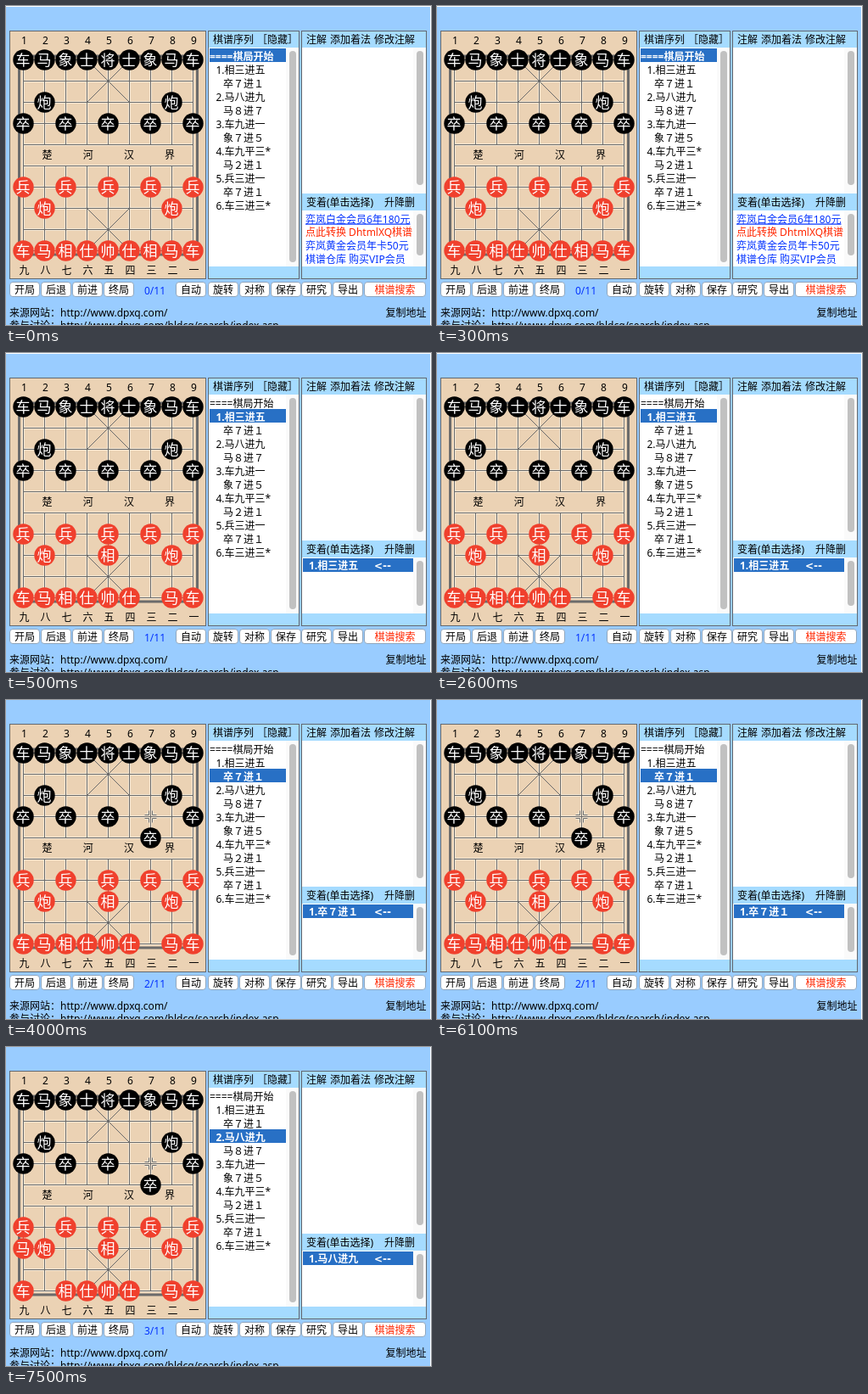
An HTML page for the animation above (8 s loop, 501 by 376 pixels).

```html
<!DOCTYPE html>
<html lang="zh-CN">
<head>
<meta charset="utf-8">
<style>
html, body { margin: 0; width: 100%; height: 100%; overflow: hidden; background: #fff; }
svg { display: block; }
text { font: 12px "Noto Sans", "Noto Sans CJK SC", "Noto Sans CJK", sans-serif; white-space: pre; }
.mid { text-anchor: middle; }
.bold { font-weight: bold; }
.arrow { font-family: "DejaVu Sans", sans-serif; font-weight: bold; }
.piece { font-size: 17px; font-weight: 300; text-anchor: middle; }
.link { text-decoration: underline; }
</style>
</head>
<body>
<svg id="stage" width="501" height="376" viewBox="0 0 501 376"></svg>
<script>
const BLUE = '#0433ff', RED = '#ff2600', SELECTED = '#2870c5', EDGE = '#62686e', HEADER = '#a5dbff';
const LINE = '#6b6b6b', LINE_GLOW = '#f6e8d4';
const stepTimes = [0, 500, 4000, 7500], loop = 8000;
const moves = ['====棋局开始', '1.相三进五', '卒７进１', '2.马八进九', '马８进７', '3.车九进一',
  '象７进５', '4.车九平三*', '马２进１', '5.兵三进一', '卒７进１', '6.车三进三*'];
// Each board move: [from column, from row, to column, to row]
const boardMoves = [[6, 9, 4, 7], [6, 3, 6, 4], [1, 9, 0, 7]];
const offers = [['弈岚白金会员6年180元', BLUE, 'link'], ['点此转换 DhtmlXQ棋谱', RED],
  ['弈岚黄金会员年卡50元', BLUE], ['棋谱仓库 购买VIP会员', BLUE]];
const buttons = [[4, '开局'], [41, '后退'], [78, '前进'], [115, '终局'], [200, '自动'], [238, '旋转'],
  [275, '对称'], [312, '保存'], [348, '研究'], [385, '导出'], [422, '棋谱搜索', 73, RED]];

// Centres of the board points
const column = i => 20.5 + 25 * i;
const row = i => 62.5 + 25 * i;
const rect = (x, y, w, h, fill, extra = '') =>
  `<rect x="${x}" y="${y}" width="${w}" height="${h}" fill="${fill}" ${extra}/>`;
const panel = (x, w, fill) => rect(x + .5, 28.5, w - 1, 292, fill, `stroke="${EDGE}"`);
const path = (d, width = 1, color = LINE) =>
  `<path d="${d}" fill="none" stroke="${color}" stroke-width="${width}"/>`;
// y is the vertical middle of the text
const label = (x, y, words, fill = '#000', cls = '') =>
  `<text x="${x}" y="${y + 4.5}" fill="${fill}" class="${cls}">${words.replace(/</g, '&lt;')}</text>`;
const scrollbar = (x, top, bottom) => rect(x, top, 8, bottom - top, '#c1c1c1', 'rx="4"');

function boardLines() {
  let grid = '', diagonals = '';
  for (let r = 0; r < 10; r++) grid += `M20.5 ${row(r)}h200`;
  for (let c = 0; c < 9; c++)
    grid += `M${column(c)} 62.5` + (c % 8 ? 'v100m0 25v100' : 'v225');
  for (const y of [row(0), row(7)]) diagonals += `M95.5 ${y}l50 50m0 -50l-50 50`;
  const marks = [[1, 2], [7, 2], [1, 7], [7, 7]];
  for (let c = 0; c < 9; c += 2) marks.push([c, 3], [c, 6]);
  for (const [c, r] of marks)
    for (const sx of [-1, 1]) for (const sy of [-1, 1])
      if (c + sx >= 0 && c + sx <= 8)
        grid += `M${column(c) + 7 * sx} ${row(r) + 2 * sy}h${-5 * sx}v${5 * sy}`;
  return path(grid, 3, LINE_GLOW) + path(grid + diagonals);
}

function pieces(step) {
  const set = [];
  const add = (c, r, name, red) => set.push({ c, r, name, red });
  [...'车马象士将士象马车'].forEach((name, c) => add(c, 0, name, false));
  [...'车马相仕帅仕相马车'].forEach((name, c) => add(c, 9, name, true));
  for (const c of [1, 7]) { add(c, 2, '炮', false); add(c, 7, '炮', true); }
  for (let c = 0; c < 9; c += 2) { add(c, 3, '卒', false); add(c, 6, '兵', true); }
  for (const [c, r, toC, toR] of boardMoves.slice(0, step))
    Object.assign(set.find(p => p.c === c && p.r === r), { c: toC, r: toR });
  return set.map(({ c, r, name, red }) =>
    `<circle cx="${column(c)}" cy="${row(r)}" r="12.2" fill="${red ? '#f0402d' : '#000'}"/>` +
    `<text class="piece" x="${column(c) - .5}" y="${row(r) + 6}" fill="#fff">${name}</text>`).join('');
}

function board(step) {
  const edge = (names, y) => [...names].map((n, c) => label(column(c) + 1, y, n, '#000', 'mid')).join('');
  return panel(4, 232, '#ebd2b4') +
    path('M15.5 58H225.5V292H15.5Z', 3) + boardLines() +
    edge('123456789', 39) + edge('九八七六五四三二一', 310.5) +
    [...'楚河汉界'].map((n, i) => label(48.5 + 48.2 * i, 174.5, n, '#000', 'mid')).join('') +
    pieces(step);
}

function moveList(step) {
  let out = panel(238, 108, HEADER) + rect(239, 48, 106, 258, '#fff') +
    rect(330, 48, 15, 258, '#fafafa') + scrollbar(334, 52, 301) +
    label(244, 38.5, '棋谱序列') + label(296, 38.5, '［隐藏］');
  moves.forEach((move, i) => {
    const on = i === step;
    const x = i === 0 ? 240 : i % 2 ? 247.5 : 256;
    if (on) out += rect(240, 49 + 16 * i, 90, 16, SELECTED);
    out += label(x, 58 + 16 * i, move, on ? '#fff' : '#000', on ? 'bold' : '');
  });
  return out;
}

function sidePanel(step) {
  let out = panel(348, 148, HEADER) + rect(349, 48, 146, 172, '#fff') +
    rect(349, 240, 146, 66, '#fff') + rect(480, 48, 15, 172, '#fafafa') + rect(480, 240, 15, 66, '#fafafa') +
    scrollbar(484, 52, 210) + scrollbar(484, 244, step ? 297 : 293) +
    label(354, 38.5, '注解') + label(382, 38.5, '添加着法') + label(434, 38.5, '修改注解') +
    label(354, 230, '变着(单击选择)') + label(446, 230, '升降删');
  if (!step)
    return out + offers.map(([words, color, cls], i) => label(353, 250 + 15.8 * i, words, color, cls)).join('');
  return out + rect(350, 241, 130, 16, SELECTED) +
    label(357, 249, step === 2 ? '1.卒７进１' : '1.' + moves[step].slice(2), '#fff', 'bold') +
    label(434, 249, '<--', '#fff', 'arrow');
}

function footer(step) {
  return buttons.map(([x, name, w = 36, color = '#000']) =>
    rect(x + .5, 324.5, w - 1, 17, '#fff', 'rx="3.5" stroke="#8fa6bd"') +
    label(x + w / 2, 333, name, color, 'mid')).join('') +
    label(175.5, 334.5, `${step}/11`, BLUE, 'mid') +
    label(4, 360, '来源网站：http://www.dpxq.com/') + label(447.5, 360, '复制地址') +
    label(4, 375.5, '参与讨论：http://www.dpxq.com/hldcg/search/index.asp');
}

const stage = document.getElementById('stage');
let shown = -1;

function draw(step) {
  const shift = step < 2 ? 1 : 0;
  stage.innerHTML = rect(0, shift, 500, 376, '#99ccff') +
    `<g transform="translate(0 ${shift})">${board(step)}${moveList(step)}${sidePanel(step)}${footer(step)}</g>`;
}

const start = performance.now();
function tick(now) {
  const time = Math.max(0, now - start) % loop;
  const step = stepTimes.filter(t => t <= time).length - 1;
  if (step !== shown) draw(shown = step);
  requestAnimationFrame(tick);
}
tick(start);
</script>
</body>
</html>
```
